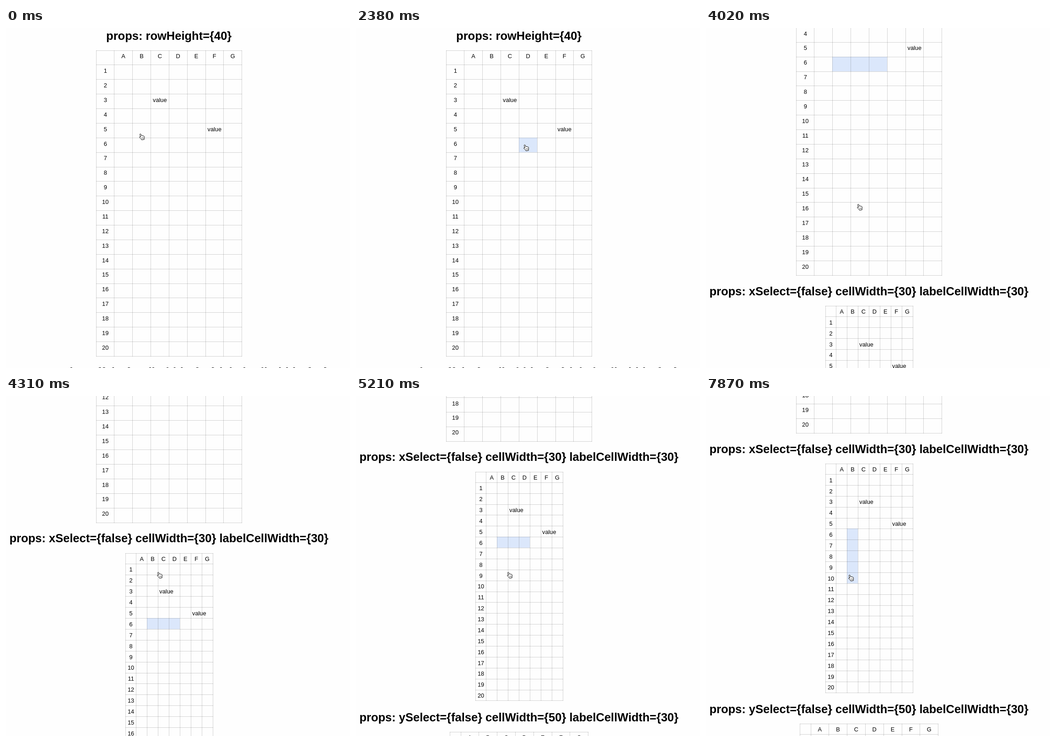
These frames come from a looping animation (752 px wide and 744 px high, 8000 ms). An HTML page with a canvas:

```html
<!DOCTYPE html>
<html>
<head>
<meta charset="utf-8">
<style>
  html, body { margin: 0; width: 752px; height: 744px; overflow: hidden; background: #fefefe; }
  canvas { display: block; }
</style>
</head>
<body>
<canvas id="stage" width="752" height="744"></canvas>
<script>
const ctx = document.getElementById('stage').getContext('2d');
const LOOP = 8000, STEP = 148.4;
const COLS = 7, ROWS = 20, CENTER = 356.2, PADDING = 3.2;
const FONT = '"Liberation Sans", Arial, sans-serif';
const VALUES = [[2, 3], [5, 5]];

// x, y: top left corner of cell A1 on the page; left: edge of the label column
const tables = [
  { title: 'rowHeight={40}', left: 197.4, x: 236.4, y: 80.4, w: 39.83, h: 31.88 },
  { title: 'xSelect={false} cellWidth={30} labelCellWidth={30}', left: 261.2, x: 284.4, y: 808.3, w: 23.88, h: 23.88 },
  { title: 'ySelect={false} cellWidth={50} labelCellWidth={30}', left: 205.3, x: 228.5, y: 1377.5, w: 39.83, h: 23.88 },
];

// Keys are [step, ...values]
const scrollKeys = [[25, 0], [26, 45], [29, 441.5], [31, 545], [33, 600], [35, 619.5], [38, 619.5], [41, 637.3]];
const cursorKeys = [
  [1, 297, 238], [5, 412, 373], [7, 459, 223], [9, 459, 223], [11, 300, 352], [13, 300, 352],
  [16, 372, 262], [18, 293, 271], [19, 293, 271], [20, 294, 272], [21, 294, 272], [23, 336, 392],
  [41, 336, 392], [42, 361, 356], [43, 359, 430], [44, 360, 462], [45, 360, 474],
  [49, 318, 305], [50, 318, 306], [53, 317, 398],
];
const selections = {
  1: 'B5:B5', 2: 'B5:B6', 3: 'B5:C7', 4: 'B5:D8', 5: 'B5:E9',
  9: 'F5:F5', 10: 'D5:F7', 11: 'B5:F9',
  16: 'D6:D6', 17: 'C6:D6', 18: 'B6:D6',
  42: 'D8:D8', 43: 'D8:D9', 44: 'D8:D12', 45: 'D8:D13',
  50: 'B6:B6', 51: 'B6:B7', 52: 'B6:B9', 53: 'B6:B10',
};

const hand = new Path2D('M3.6 7.6L1.7 2.8Q1.2 .8 2.5 .6Q3.6 .5 4.1 1.8L5.1 4.6Q6.3 3.8 7.1 4.8' +
  'Q8.3 4.1 9.1 5.2Q10.7 4.8 11.2 6.4Q11.8 8.4 11.1 10.4L11.2 12.8L5.6 13.8Q4.6 11.6 2.6 10.2' +
  'L.9 8.5Q.4 7 1.8 6.8Q2.8 6.8 3.6 7.6Z');
const creases = new Path2D('M5.6 8.6L6 11.4M7.4 8.4L7.8 11.2M9.2 8.2L9.5 11');

function sample(keys, step) {
  const next = keys.findIndex(key => key[0] > step);
  if (next < 0) return keys[keys.length - 1].slice(1);
  if (next === 0) return keys[0].slice(1);
  const a = keys[next - 1], b = keys[next];
  const p = (step - a[0]) / (b[0] - a[0]);
  return a.slice(1).map((v, i) => v + (b[i + 1] - v) * p);
}

function selectionAt(step) {
  while (step > 0 && !selections[step]) step--;
  if (!step) return null;
  return selections[step].split(':').map(cell => [cell.charCodeAt(0) - 65, cell.slice(1) - 1]);
}

function drawTable({ title, left, x, y, w, h }, scroll, selection) {
  const y0 = y - scroll;
  const colX = c => Math.round(c < 0 ? left : x + c * w);
  const rowY = r => Math.round(r < 0 ? y0 - h + .7 : y0 + r * h);
  const right = colX(COLS), bottom = rowY(ROWS);

  if (selection) {
    const [[c1, r1], [c2, r2]] = selection;
    ctx.fillStyle = '#dbe7fb';
    ctx.fillRect(colX(c1), rowY(r1), colX(c2 + 1) - colX(c1), rowY(r2 + 1) - rowY(r1));
  }

  ctx.fillStyle = 'rgba(0, 0, 0, .17)';
  for (let c = -1; c <= COLS; c++) ctx.fillRect(colX(c), rowY(-1), 1, bottom - rowY(-1) + 1);
  for (let r = -1; r <= ROWS; r++) ctx.fillRect(colX(-1), rowY(r), right - colX(-1) + 1, 1);

  ctx.fillStyle = '#000';
  ctx.textAlign = 'center';
  ctx.font = `bold 25.5px ${FONT}`;
  ctx.fillText('props: ' + title, CENTER, Math.round(y0 - h - 22.5));

  ctx.font = `12.75px ${FONT}`;
  const baseline = r => Math.round(y0 + r * h + 17.7);
  const center = c => x + (c + .5) * w + .3;
  for (let c = 0; c < COLS; c++) ctx.fillText(String.fromCharCode(65 + c), center(c), baseline(-1));
  for (let r = 0; r < ROWS; r++) ctx.fillText(r + 1, (left + x) / 2 + .3, baseline(r));

  ctx.textAlign = 'left';
  const textWidth = ctx.measureText('value').width;
  for (const [c, r] of VALUES.map(([col, row]) => [col, row - (row === 3 ? 1 : 1)])) {
    ctx.fillText('value', Math.max(x + c * w + PADDING, center(c) - textWidth / 2), baseline(r));
  }
}

function drawCursor(x, y) {
  ctx.save();
  ctx.translate(Math.round(x) - 6, Math.round(y) - 7);
  ctx.lineJoin = 'round';
  ctx.fillStyle = '#fff';
  ctx.strokeStyle = '#000';
  ctx.fill(hand);
  ctx.stroke(hand);
  ctx.lineWidth = .6;
  ctx.stroke(creases);
  ctx.restore();
}

function draw() {
  const step = Math.floor(performance.now() % LOOP / STEP);
  const [scroll] = sample(scrollKeys, step);
  const selection = selectionAt(step);
  ctx.fillStyle = '#fefefe';
  ctx.fillRect(0, 0, 752, 744);
  for (const table of tables) drawTable(table, scroll, selection);
  drawCursor(...sample(cursorKeys, step));
  requestAnimationFrame(draw);
}
draw();
</script>
</body>
</html>
```
